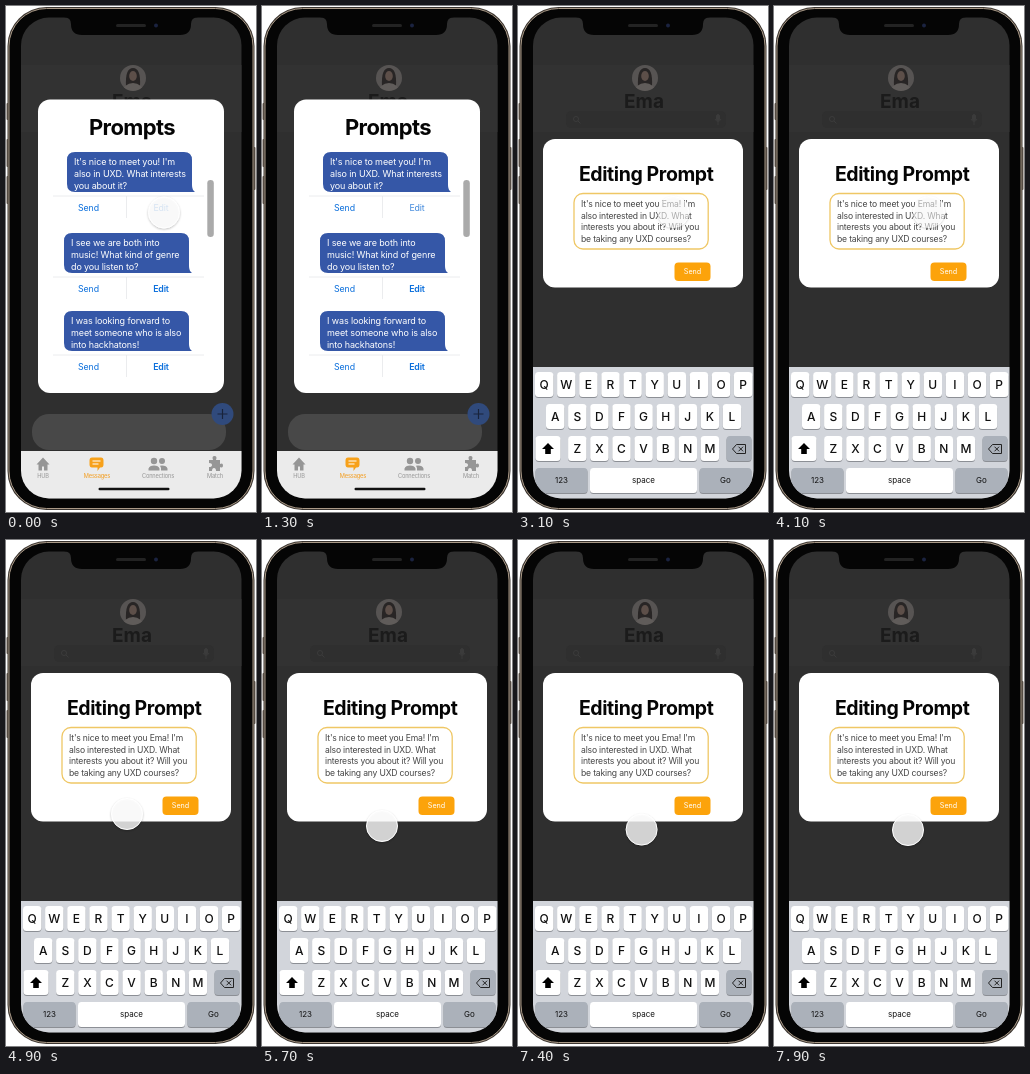
An HTML page for the animation above (8 s loop, 250x506 px).

```html
<!DOCTYPE html>
<html lang="en">
<head>
<meta charset="utf-8">
<title>Prompt editing</title>
<style>
html, body { margin: 0; width: 100%; height: 100%; overflow: hidden; background: #fff; }
svg { display: block; width: 250px; height: 506px; font-family: Inter, Roboto, sans-serif; }
.mid { text-anchor: middle; }
.title { font-weight: 700; fill: #050505; }
.bubble { font-size: 9px; letter-spacing: -.12px; fill: #fff; }
.draft { font-size: 8.6px; letter-spacing: -.18px; fill: #444; }
.tab { font-size: 5.7px; letter-spacing: -.15px; }
</style>
</head>
<body>
<svg viewBox="0 0 250 506">
  <defs>
    <clipPath id="screen"><rect x="15" y="11.5" width="220.5" height="481" rx="28"/></clipPath>
    <clipPath id="face"><circle cx="127" cy="72" r="13"/></clipPath>
    <filter id="shadow" x="-30%" y="-30%" width="160%" height="160%">
      <feDropShadow dx="0" dy="1" stdDeviation="1.2" flood-opacity=".28"/>
    </filter>
  </defs>

  <g fill="#6e6258">
    <rect x="0.500" y="97" width="3" height="17" rx="1"/>
    <rect x="0.500" y="133" width="3" height="28" rx="1"/>
    <rect x="0.500" y="170" width="3" height="28" rx="1"/>
    <rect x="246.500" y="141" width="3" height="43" rx="1"/>
  </g>
  <rect x="1.500" y="1" width="247" height="503" rx="39" fill="#3a342f"/>
  <rect x="3" y="2.500" width="244" height="500" rx="37.500" fill="#050505" stroke="#a99987"/>

  <g clip-path="url(#screen)">
    <rect x="15" y="11" width="221" height="482" fill="#2f2f2f"/>
    <rect x="15" y="59" width="221" height="67" fill="#323232"/>
    <g clip-path="url(#face)" opacity=".55">
      <rect x="114" y="59" width="26" height="26" fill="#77716f"/>
      <path d="M120 80 Q119 62 127 62 Q135 62 134 80Z" fill="#221d1c"/>
      <path d="M116 87 Q117 78 127 77 Q137 78 138 87Z" fill="#88807d"/>
      <ellipse cx="127" cy="70" rx="3.8" ry="5" fill="#81685e"/>
    </g>
    <text class="mid title" x="126" y="102" font-size="19" style="fill:#1b1b1b">Ema</text>
    <g fill="none" stroke="#3b3b3b">
      <rect x="48" y="105" width="160" height="17" rx="5" fill="#2f2f2f" stroke="none"/>
      <circle cx="58" cy="113" r="2.5"/><path d="M60 115l2.5 2.5"/>
      <rect x="198.5" y="108.5" width="3" height="6" rx="1.5" fill="#3b3b3b"/>
      <path d="M197 113q3 5 6 0M200 116v3"/>
    </g>

    <g id="prompts">
      <rect x="26" y="408" width="194" height="36" rx="17" fill="#484848"/>
      <circle cx="216.500" cy="408" r="11" fill="#304a7c"/>
      <path d="M211.500 408h10M216.500 403v10" stroke="#18233b" stroke-width="1.2"/>
      <rect x="32" y="93.500" width="186" height="293.500" rx="12" fill="#fff"/>
      <text class="mid title" x="126" y="128.7" font-size="22" letter-spacing="-.6">Prompts</text>
      <g id="cards"></g>
      <rect x="201.300" y="174" width="6.500" height="57" rx="3.2" fill="#aaa"/>
      <rect x="15" y="445" width="221" height="48" fill="#ebebeb"/>
      <g fill="#969696">
        <path d="M30.500 458.500L37 451.500l6.500 7h-2v6H38v-4h-2v4h-3.500v-6z"/>
        <path d="M86 451.500h9q2.500 0 2.500 3v4q0 3-2.500 3h-1l-2.500 3.500v-3.500H86q-2.500 0-2.500-3v-4q0-3 2.500-3z" fill="#f7a11a"/>
        <path d="M86.500 455h8M86.500 458h6" stroke="#fff"/>
        <circle cx="148" cy="455" r="3.2"/><circle cx="156" cy="455" r="3"/>
        <path d="M142.500 464.500v-2q1-3 5.500-3t5.500 3v2zM155 464.500v-2.500l-1-2.300q6.500-.7 7.500 2.800v2z"/>
        <path d="M203 454h4q-1.500-4 1.500-4t1.500 4h4v4q3 -1.500 3 1.500t-3 1.500v4h-4q0-3-2-3t-2 3h-3v-4q3 0 3-2t-3-2z"/>
      </g>
      <g id="tabs" class="mid tab"></g>
      <rect x="92.500" y="481.800" width="71" height="2.500" rx="1.2" fill="#111"/>
    </g>

    <g id="editor">
      <rect x="25" y="133" width="200" height="148.5" rx="12" fill="#fff"/>
      <text class="mid title" x="128.2" y="175" font-size="19.5" letter-spacing="-.4">Editing Prompt</text>
      <rect x="56" y="187.5" width="134.200" height="55.5" rx="9" fill="#fff" stroke="#efc765" stroke-width="1.3"/>
      <g id="draft" class="draft"></g>
      <rect x="156.5" y="256.5" width="36" height="18.5" rx="4" fill="#fca30b"/>
      <text class="mid" x="174.5" y="268.3" font-size="7.2" fill="#fff">Send</text>
      <rect x="15" y="361" width="221" height="132" fill="#d2d5db"/>
      <g id="keys" class="mid" fill="#111"></g>
      <path d="M30 437l6 6h-3.2v5h-5.6v-5H24z"/>
      <path d="M214.5 443l4-4.5h9v9h-9zM220.5 440.7l4.6 4.6m0-4.6l-4.6 4.6" fill="none" stroke="#222"/>
    </g>
    <circle id="touch" r="15.500" fill="#fff" fill-opacity=".76" stroke="#fff" filter="url(#shadow)"/>
  </g>

  <path d="M58 11q7 .5 7 7q0 11 11 11h98q11 0 11-11q0-6.500 7-7z" fill="#050505"/>
  <rect x="110" y="18" width="30" height="3" rx="1.5" fill="#232323"/>
  <circle cx="150" cy="19.500" r="2" fill="#1b2340"/>
</svg>
<script>
const LOOP = 8000, SWITCH = 1400;
const el = id => document.getElementById(id);

const lines = (rows, x, y, step) =>
  rows.map((row, i) => `<text x="${x}" y="${y + i * step}">${row}</text>`).join("");

function promptCard(x, y, rows, pressed) {
  const rule = y + 44;
  return `<path d="M${x + 8} ${y}h109q8 0 8 8v25q0 5 3 7h-120q-8 0-8-8v-24q0-8 8-8z" fill="#3557a7"/>
    <g class="bubble">${lines(rows, x + 7, y + 13, 12)}</g>
    <path d="M47 ${rule}H198M120.5 ${rule}v22" stroke="#e6e8ea" stroke-width=".8"/>
    <g class="mid" font-size="8.8" letter-spacing="-.15" fill="#0b6fdc">
      <text x="82.5" y="${y + 58.5}">Send</text>
      <text x="155" y="${y + 58.5}" ${pressed ? 'fill="#4089dc"' : 'font-weight="600"'}>Edit</text>
    </g>`;
}

el("cards").innerHTML =
  promptCard(61, 146, ["It's nice to meet you! I'm", "also in UXD. What interests", "you about it?"], true) +
  promptCard(58, 227, ["I see we are both into", "music! What kind of genre", "do you listen to?"]) +
  promptCard(58, 305, ["I was looking forward to", "meet someone who is also", "into hackhatons!"]);

el("draft").innerHTML = lines(["It's nice to meet you Ema! I'm", "also interested in UXD. What",
  "interests you about it? Will you", "be taking any UXD courses?"], 63, 201, 11.6);

el("tabs").innerHTML = [["HUB", 37], ["Messages", 91], ["Connections", 152], ["Match", 209]]
  .map(([name, x]) => `<text x="${x}" y="471.7" fill="${name === "Messages" ? "#f39c1c" : "#959595"}">${name}</text>`)
  .join("");

function key(x, y, w, label = "", fill = "#fff", size = 12) {
  return `<rect x="${x}" y="${y + 1}" width="${w}" height="25" rx="3.5" fill="#8c8f95"/>
    <rect x="${x}" y="${y}" width="${w}" height="25" rx="3.5" fill="${fill}"/>
    <text x="${x + w / 2}" y="${y + 12.5 + size * .36}" font-size="${size}">${label}</text>`;
}
const keyRow = (letters, first, y) =>
  [...letters].map((c, i) => key(first + i * 22.1 - 9.2, y, 18.4, c)).join("");

const GREY = "#abb1ba";
el("keys").innerHTML =
  `<g font-weight="500">${keyRow("QWERTYUIOP", 26.2, 366)}${keyRow("ASDFGHJKL", 37.2, 398)}${keyRow("ZXCVBNM", 59.3, 430)}</g>` +
  key(17.5, 430, 25) + key(208.5, 430, 25, "", GREY) +
  key(17.5, 462, 52, "123", GREY, 8) + key(72, 462, 107, "space", "#fff", 8) + key(181.5, 462, 52, "Go", GREY, 8);

// Each stop: time, x, y, opacity
const touchPath = [
  [0, 158, 206.5, 1], [600, 158, 206.5, 1], [900, 158, 206.5, 0], [1399, 156, 206, 0],
  [1400, 156, 206, .7], [4100, 155, 206, .7], [4900, 121, 274, 1], [5700, 120, 286, 1],
  [5800, 120, 286, 1], [6600, 121.5, 289.5, 1], [7300, 121.5, 289.5, 1], [7900, 134, 290, 1], [LOOP, 134, 290, 1]
];

function touchAt(t) {
  const i = touchPath.findIndex(stop => stop[0] > t);
  const a = touchPath[i - 1], b = touchPath[i];
  const k = (t - a[0]) / (b[0] - a[0]);
  return a.map((v, j) => v + (b[j] - v) * k);
}

function render(t) {
  const editing = t >= SWITCH;
  el("prompts").style.display = editing ? "none" : "";
  el("editor").style.display = editing ? "" : "none";
  const [, x, y, opacity] = touchAt(t);
  const touch = el("touch");
  touch.setAttribute("cx", x);
  touch.setAttribute("cy", y);
  touch.setAttribute("opacity", opacity);
}

const start = performance.now();
function tick() {
  render((performance.now() - start) % LOOP);
  requestAnimationFrame(tick);
}
tick();
</script>
</body>
</html>
```
